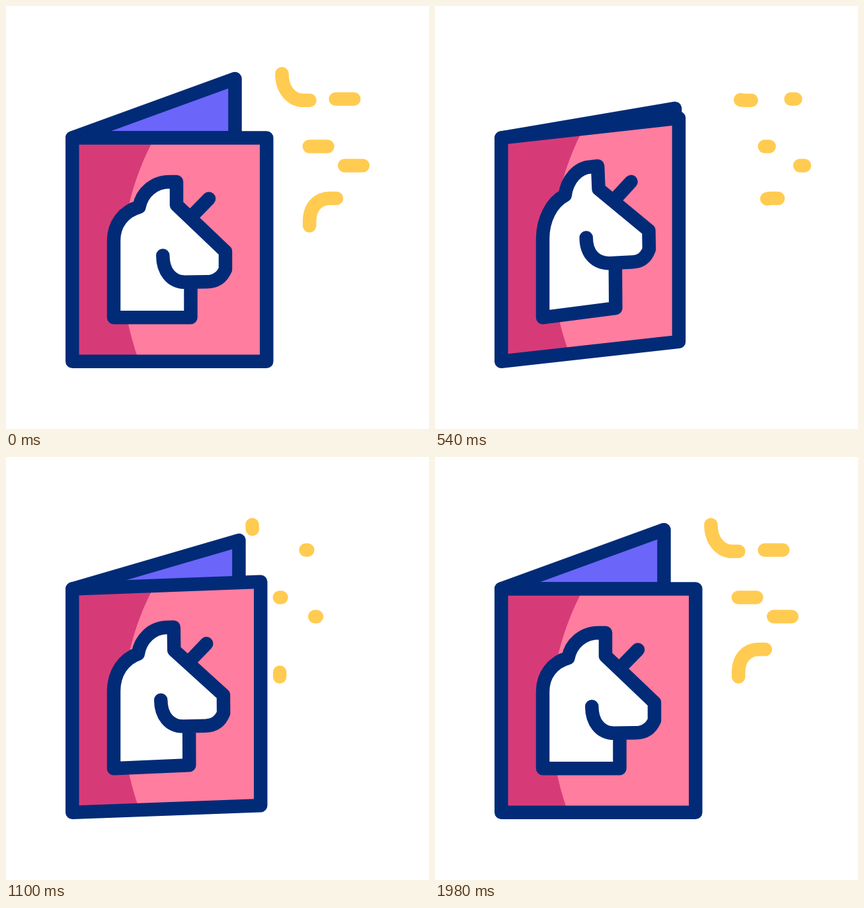
Animation of 640x640 px, one loop 2.4 s. Source, as an HTML page with a canvas:

```html
<!DOCTYPE html>
<html lang="en">
<head>
<meta charset="utf-8">
<title>Unicorn card</title>
<style>
  html, body { margin: 0; width: 100%; height: 100%; overflow: hidden; background: #fff; }
  canvas { display: block; width: 640px; height: 640px; }
</style>
</head>
<body>
<canvas id="stage"></canvas>
<script>
const LOOP = 2400;
const NAVY = '#022b77', PINK = '#ff7d9f', PLUM = '#d63b78', VIOLET = '#6b65fa', GOLD = '#ffcb51';

const canvas = document.getElementById('stage');
const ctx = canvas.getContext('2d');
const ratio = window.devicePixelRatio || 1;
canvas.width = canvas.height = 640 * ratio;

const clamp = v => Math.min(1, Math.max(0, v));
const part = (t, from, to) => clamp((t - from) / (to - from));
const smooth = u => u * u * (3 - 2 * u);

// Cubic easing with handles (a, 0) and (b, 1)
function ease(x, a, b) {
  let lo = 0, hi = 1;
  for (let i = 0; i < 24; i++) {
    const s = (lo + hi) / 2, r = 1 - s;
    if (3 * r * r * s * a + 3 * r * s * s * b + s * s * s < x) lo = s; else hi = s;
  }
  return smooth(lo);
}

const swing = u => u <= 0 ? 0 : u >= 1 ? 1 : ease(u, 0.45, 0.28);
const closedness = t => swing(part(t, 0, 720)) - swing(part(t, 760, 1480));

function strokeLine(path, color) {
  ctx.strokeStyle = color;
  ctx.stroke(path);
}

function drawCard(p) {
  // Point that moves from open (x, y) by (dx, dy) when closed
  const pt = (x, y, dx = 0, dy = 0) => `${x + dx * p},${y + dy * p} `;

  const flap = new Path2D('M' + pt(100.3, 199.5) + 'L' + pt(346.5, 110, 17.5, 47.3) +
    'L' + pt(346.5, 199.5, 17.5, -8) + 'Z');
  ctx.fillStyle = VIOLET;
  ctx.fill(flap);
  strokeLine(flap, NAVY);

  const cover = new Path2D('M' + pt(100.3, 199.5) + 'L' + pt(394.3, 199.5, -26.7, -31.5) +
    'L' + pt(394.3, 537.8, -26.7, -31.5) + 'L' + pt(100.3, 537.8) + 'Z');
  ctx.fillStyle = PINK;
  ctx.fill(cover);

  ctx.save();
  ctx.clip(cover);
  ctx.fillStyle = PLUM;
  ctx.fill(new Path2D('M' + pt(225.5, 198, 0, -15) +
    'C' + pt(166, 306, 1, -13) + pt(162, 430, 2, -8) + pt(201.5, 538, 2.5, -11) +
    'L90,570 L90,150 Z'));
  ctx.restore();
  strokeLine(cover, NAVY);

  const outline = 'M' + pt(163, 471.3) + 'L' + pt(163, 355, 0, -3) +
    'C' + pt(163, 330, 0, -7) + pt(178, 310.5, -2, -14) + pt(201.5, 304, -5, -18.5) +
    'C' + pt(205.5, 282, -6, -20) + pt(224, 266, -9, -23) + pt(248, 266, -12, -24) +
    'L' + pt(258, 266, -12.5, -25) + 'L' + pt(258, 301, -11, -25.5) +
    'L' + pt(332, 371.5, -9, -33.5) + 'L' + pt(332, 398.5, -8.5, -32) +
    'Q' + pt(324, 417, -7.5, -31) + pt(304, 417.3, -7, -31.5);
  const throat = pt(279.5, 418, -7, -30);
  const base = pt(279.5, 471.3, -6.5, -15);

  ctx.fillStyle = '#fff';
  ctx.fill(new Path2D(outline + 'L' + throat + 'L' + base + 'Z'));

  strokeLine(new Path2D(outline + 'L' + pt(271, 417.8, -7, -30.2) +
    'C' + pt(250, 417.8, -8, -30) + pt(237.3, 401, -9, -28) + pt(237.3, 377.5, -9, -28.5) +
    'M' + throat + 'L' + base + 'L' + pt(163, 471.3) + 'L' + pt(163, 440) +
    'M' + pt(307, 291.5, -11, -27) + 'L' + pt(285.5, 313.5, -11.5, -25)), NAVY);
}

const sparks = [
  'M417.5,102.5 C417.5,128 433,142.8 450,142.8 L459.5,142.8',
  'M498.7,140.7 H526.3',
  'M458.9,212.4 H486.5',
  'M512.3,241.4 H539.9',
  'M459.2,332.5 L459.2,326 C459.2,303 473,291 490,291 L500,291'
].map(d => {
  const el = document.createElementNS('http://www.w3.org/2000/svg', 'path');
  el.setAttribute('d', d);
  return { path: new Path2D(d), length: el.getTotalLength() };
});

function drawSparks(t) {
  let from = 0, to = 1, shift;
  if (t < 800) {
    from = smooth(t / 800);
    shift = 50 * smooth(part(t, 167, 1057));
  } else {
    const u = part(t, 930, 1995);
    to = 0.7 * smooth(u) + 0.3 * u;
    shift = -50 * (1 - smooth(part(t, 940, 1765)));
  }
  if (to <= from) return;
  ctx.save();
  ctx.translate(shift, 0);
  for (const { path, length } of sparks) {
    if (to - from < 1) {
      ctx.setLineDash([Math.max(0.05, (to - from) * length), 1000]);
      ctx.lineDashOffset = -from * length;
    }
    strokeLine(path, GOLD);
  }
  ctx.restore();
}

function draw(t) {
  ctx.setTransform(ratio, 0, 0, ratio, 0, 0);
  ctx.fillStyle = '#fff';
  ctx.fillRect(0, 0, 640, 640);
  ctx.lineWidth = 20.5;
  ctx.lineCap = ctx.lineJoin = 'round';
  drawCard(closedness(t));
  drawSparks(t);
}

const start = performance.now();
function tick() {
  draw((performance.now() - start) % LOOP);
  requestAnimationFrame(tick);
}
tick();
</script>
</body>
</html>
```
